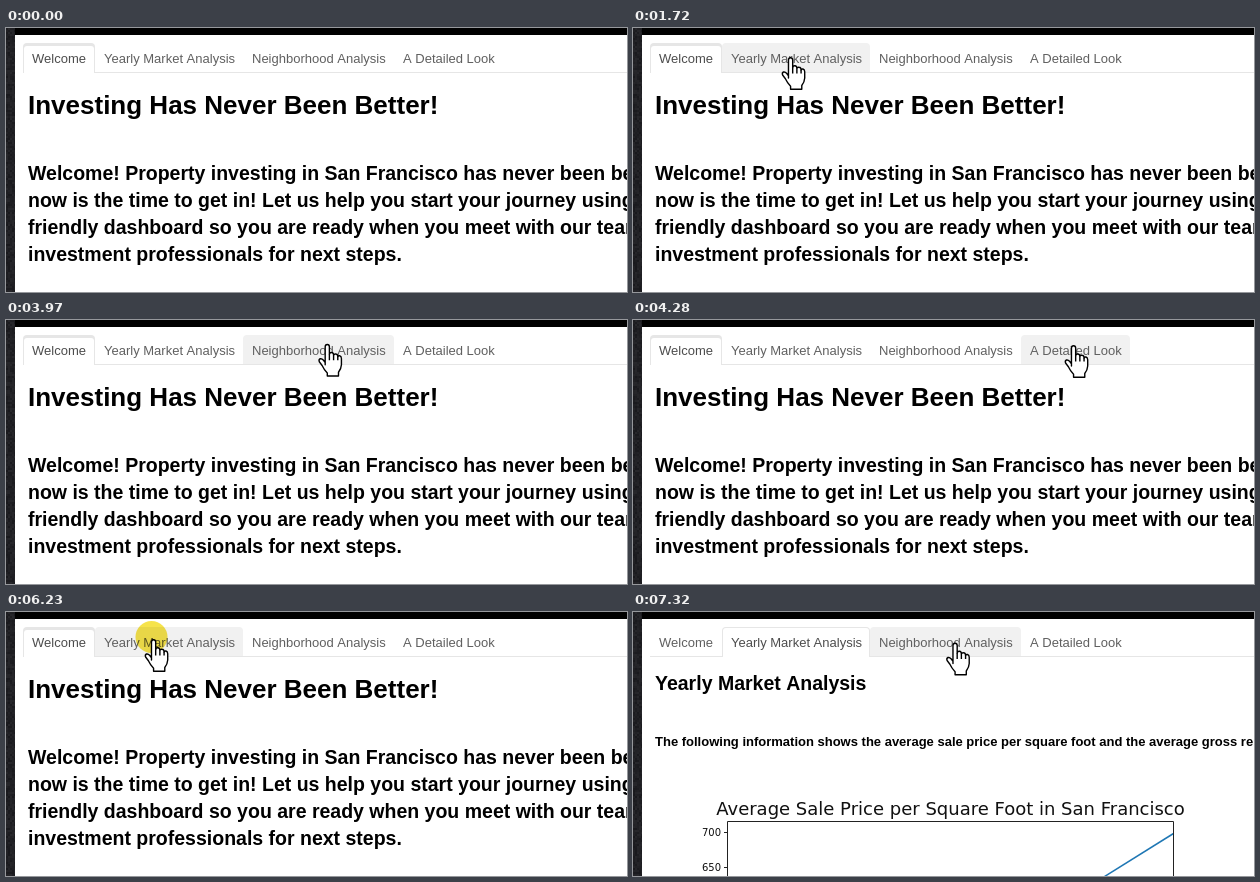
Recreate the animation shown at these times as an HTML page with a canvas. Size 621 px wide and 264 px high, loop 8 s.

```html
<!DOCTYPE html>
<html lang="en">
<head>
<meta charset="utf-8">
<title>Investment dashboard</title>
<style>
  html, body { margin: 0; width: 100%; height: 100%; overflow: hidden; background: #fff; }
  canvas { display: block; }
</style>
</head>
<body>
<canvas id="stage" width="621" height="264"></canvas>
<script>
const W = 621, H = 264, LOOP = 8000;
const CLICK = 6230, SWITCH = 6310;
const ctx = document.getElementById('stage').getContext('2d');
const SANS = '"Liberation Sans", Arial, sans-serif';
const DEJAVU = '"DejaVu Sans", sans-serif';

const tabs = [
  { label: 'Welcome', x: 17, end: 89 },
  { label: 'Yearly Market Analysis', x: 89, end: 237 },
  { label: 'Neighborhood Analysis', x: 237, end: 388 },
  { label: 'A Detailed Look', x: 388, end: 497 }
];

// Pointer moves: time span, steps, target, arc height, ease-in and ease-out powers
const origin = [240, 275];
const moves = [
  { from: 400, to: 860, steps: 7, at: [56, 35], arc: 0, a: 1.3, b: 1.6 },
  { from: 1480, to: 1720, steps: 4, at: [158, 29], arc: 0, a: 1.5, b: 1.6 },
  { from: 3130, to: 3420, steps: 5, at: [300, 24], arc: -7, a: 1.7, b: 1.43 },
  { from: 3970, to: 4520, steps: 8, at: [458, 25.5], arc: -2, a: 1.5, b: 3.27 },
  { from: 4990, to: 5450, steps: 7, at: [113, 27], arc: 2, a: 1.5, b: 1.41 },
  { from: 5680, to: 5760, steps: 2, at: [148, 27], arc: 0, a: 1, b: 1.4 },
  { from: 6920, to: 7320, steps: 6, at: [322.5, 30.5], arc: -3.5, a: 1.5, b: 1.6 }
];

const hand = new Path2D('M5 14V2Q5 .5 6.5 .5Q8 .5 8 2V7Q8.3 5.8 9.6 5.9Q11 6 11 7.5' +
  'Q11.4 6.6 12.6 6.8Q14 7 14 8.6Q14.4 7.8 15.4 8Q16.6 8.3 16.6 9.8V14' +
  'Q16.5 16.5 14.5 19V21.5H6.5V19.5Q4 17 2.8 14.5L.8 12Q.2 10.6 1.4 10Q2.6 9.7 3.8 11L5 12.5Z');
const knuckles = new Path2D('M8 7V11M11 7.5V11M14 8.6V11');
const arrow = new Path2D('M0 0V16L3.7 12.5L6.2 18.3L8.7 17.2L6.2 11.5H11.3Z');
const beam = new Path2D('M-3 -8H-1L0 -7L1 -8H3M0 -7V7M-3 8H-1L0 7L1 8H3');

function rect(color, x, y, w, h) {
  ctx.fillStyle = color;
  ctx.fillRect(x, y, w, h);
}

function text(str, x, y, size, opt = {}) {
  ctx.font = `${opt.weight || 'normal'} ${size}px ${opt.family || SANS}`;
  ctx.fillStyle = opt.color || '#000';
  ctx.textAlign = opt.align || 'left';
  ctx.fillText(str, x, y);
}

const bold = (str, y, size) => text(str, 22, y, size, { weight: 'bold' });

function stroke(color, width, points) {
  ctx.strokeStyle = color;
  ctx.lineWidth = width;
  ctx.beginPath();
  points.forEach(([x, y]) => ctx.lineTo(x, y));
  ctx.stroke();
}

function roundTop(x, y, w, h, r) {
  ctx.beginPath();
  ctx.roundRect(x, y, w, h, [r, r, 0, 0]);
}

function pointerAt(t) {
  let pos = origin;
  for (const m of moves) {
    if (t < m.from) break;
    const gap = (m.to - m.from) / (m.steps - 1);
    const step = Math.floor((t - m.from + 5) / gap);
    const p = Math.min(1, (step + 1) / m.steps);
    const e = 1 - (1 - p ** m.a) ** m.b;
    const lift = m.arc * (4 * e * (1 - e)) ** 2;
    pos = [
      pos[0] + (m.at[0] - pos[0]) * e,
      pos[1] + (m.at[1] - pos[1]) * e + lift
    ];
  }
  return pos;
}

function drawFrame() {
  rect('#fff', 0, 0, W, H);
  rect('#000', 9, 0, W - 9, 7);
  // Grainy dark margin
  let seed = 7;
  for (let y = 0; y < H; y += 2) {
    for (let x = 0; x < 9; x += 2) {
      seed = (seed * 16807) % 2147483647;
      const v = 25 + seed % 15;
      rect(`rgb(${v},${v},${v + 4})`, x, y, Math.min(2, 9 - x), 2);
    }
  }
}

function drawTabs(active, hover) {
  rect('#e6e6e6', 17, 44, W - 17, 1);
  tabs.forEach((tab, i) => {
    const w = tab.end - tab.x;
    if (i === active) {
      const top = i === 0 ? 3 : 1;
      roundTop(tab.x, 15, w, 30, 4);
      ctx.fillStyle = '#e6e6e6';
      ctx.fill();
      roundTop(tab.x + 1, 15 + top, w - 2, 30 - top, 3);
      ctx.fillStyle = '#fff';
      ctx.fill();
    } else if (i === hover) {
      roundTop(tab.x, 15, w, 29, 4);
      ctx.fillStyle = '#f1f1f1';
      ctx.fill();
    }
    text(tab.label, tab.x + 9, 35, 13, { color: i === active ? '#4d4d4d' : '#606060' });
  });
}

function drawWelcome() {
  bold('Investing Has Never Been Better!', 86, 26);
  [
    'Welcome! Property investing in San Francisco has never been better,',
    'now is the time to get in! Let us help you start your journey using our',
    'friendly dashboard so you are ready when you meet with our team of',
    'investment professionals for next steps.'
  ].forEach((line, i) => bold(line, 152 + 27 * i, 19.5));
}

function drawYearly() {
  bold('Yearly Market Analysis', 78, 19.5);
  bold('The following information shows the average sale price per square foot and the average gross rent', 134, 13);
  text('Average Sale Price per Square Foot in San Francisco', 317.5, 203, 18,
    { family: DEJAVU, align: 'center', color: '#111' });
  stroke('#1f77b4', 1.5, [[470, 265.5], [540.5, 221.5]]);
  stroke('#222', 1, [[94.5, H], [94.5, 209.5], [540.5, 209.5], [540.5, H]]);
  [[700, 220.5], [650, 255.5]].forEach(([value, y]) => {
    stroke('#222', 1, [[91, y], [94.5, y]]);
    text(value, 88, y + 3.5, 10, { family: DEJAVU, align: 'right', color: '#111' });
  });
}

function drawHalo() {
  ctx.globalCompositeOperation = 'multiply';
  ctx.fillStyle = '#f6e34b';
  ctx.beginPath();
  ctx.arc(145.5, 25, 16, 0, Math.PI * 2);
  ctx.fill();
  ctx.globalCompositeOperation = 'source-over';
}

function drawPointer(x, y) {
  const overText = (y > 62 && y < 92) || (y > 136 && y < 240);
  ctx.save();
  ctx.translate(x, y);
  ctx.scale(1.4, 1.5);
  ctx.strokeStyle = '#000';
  ctx.fillStyle = '#fff';
  ctx.lineWidth = 1;
  ctx.lineJoin = 'round';
  if (y < 45) {
    ctx.translate(-6.8, 0);
    ctx.fill(hand);
    ctx.stroke(hand);
    ctx.stroke(knuckles);
  } else if (overText) {
    ctx.stroke(beam);
  } else {
    ctx.fill(arrow);
    ctx.stroke(arrow);
  }
  ctx.restore();
}

function render(t) {
  const [x, y] = pointerAt(t);
  const active = t < SWITCH ? 0 : 1;
  const hover = y < 45 ? tabs.findIndex(tab => x >= tab.x && x < tab.end) : -1;
  drawFrame();
  drawTabs(active, hover);
  if (active === 0) drawWelcome();
  else drawYearly();
  if (t >= CLICK && t < SWITCH) drawHalo();
  if (t >= moves[0].from) drawPointer(x, y);
}

const start = performance.now();
function tick() {
  render((performance.now() - start) % LOOP);
  requestAnimationFrame(tick);
}
tick();
</script>
</body>
</html>
```
